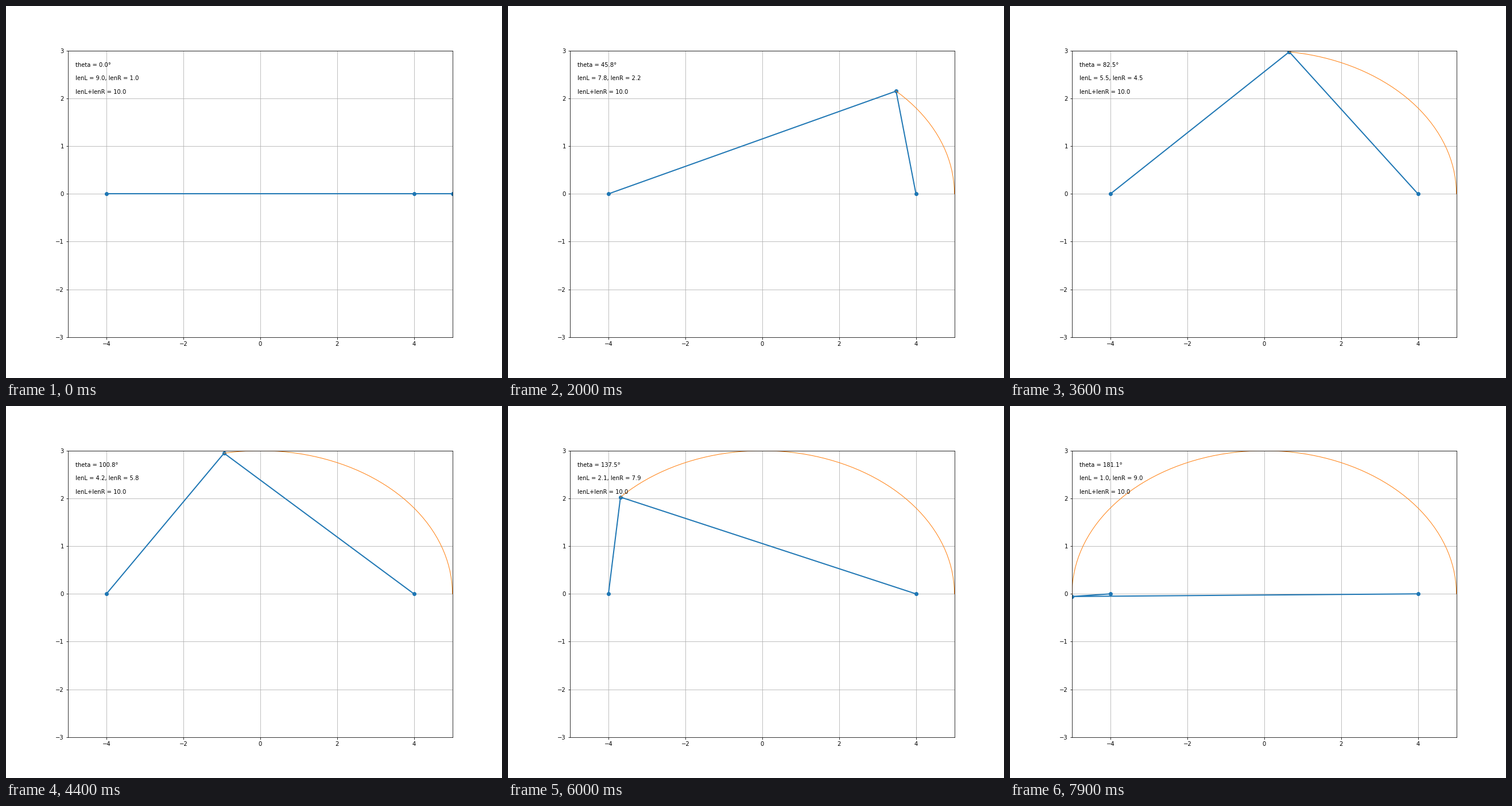
A matplotlib script for the animation above (8000 ms loop, 864x648 px).

```python
import numpy as np
import matplotlib.pyplot as plt
from matplotlib.animation import FuncAnimation

A, B = 5, 3                # semi-axes of the ellipse
C = np.sqrt(A**2 - B**2)   # focal distance
STEP = 0.04                # radians per frame
FRAMES = 80
INTERVAL = 100

theta = STEP * np.arange(FRAMES)
xs, ys = A * np.cos(theta), B * np.sin(theta)

fig, ax = plt.subplots(figsize=(12, 9), dpi=72)
ax.set_xlim(-A, A)
ax.set_ylim(-B, B)
ax.grid()

string, = ax.plot([], [], "o-", lw=2)
trace, = ax.plot([], [], lw=1)
label = ax.text(0.02, 0.85, "", transform=ax.transAxes)


def update(i):
    x, y = xs[i], ys[i]
    left, right = np.hypot(x + C, y), np.hypot(x - C, y)
    string.set_data([-C, x, C], [0, y, 0])
    trace.set_data(xs[:i + 1], ys[:i + 1])
    label.set_text(
        f"theta = {np.degrees(theta[i]):.1f}°\n\n"
        f"lenL = {left:.1f}, lenR = {right:.1f}\n\n"
        f"lenL+lenR = {left + right:.1f}"
    )
    return string, trace, label


anim = FuncAnimation(fig, update, frames=FRAMES, interval=INTERVAL,
                     repeat=True, repeat_delay=0)
plt.show()
```
